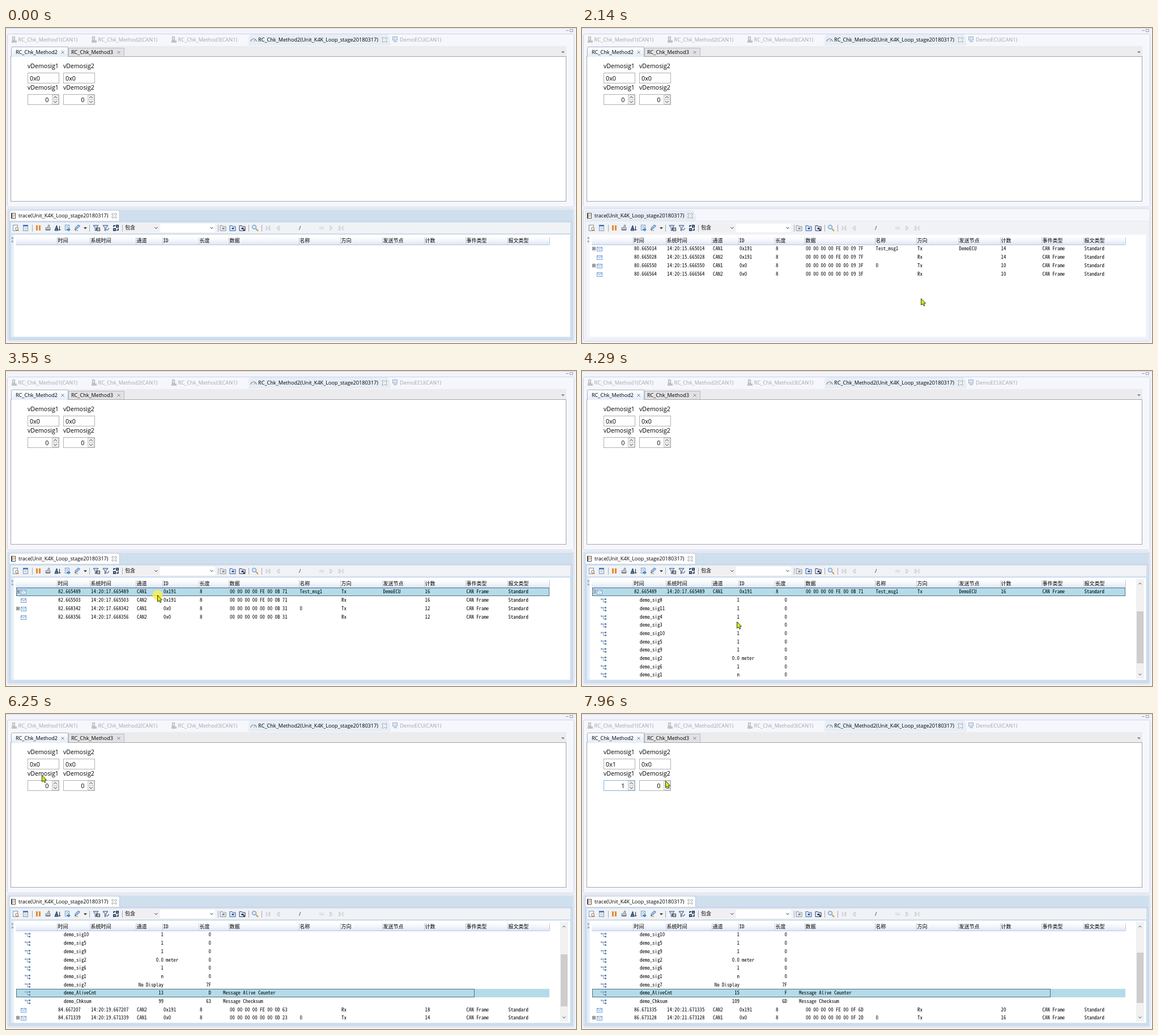
Recreate the animation shown at these times as an HTML page. Size 1006 px wide and 557 px high, loop 8000 ms.

```html
<!DOCTYPE html>
<html lang="zh-CN">
<head>
<meta charset="utf-8">
<title>CAN trace</title>
<style>
html, body { margin: 0; width: 100%; height: 100%; overflow: hidden; background: #f3f4fa; }
svg { display: block; width: 1006px; height: 557px; }
text { white-space: pre; }
.ui { font-family: "Open Sans", "Noto Sans", sans-serif; }
.cjk { font-family: "Noto Sans CJK SC", "Noto Sans CJK", sans-serif; }
.mono { font-family: "Noto Sans Mono CJK SC", "Noto Sans CJK SC", monospace; }
</style>
</head>
<body>
<svg id="stage" viewBox="0 0 1006 557" xmlns="http://www.w3.org/2000/svg">
  <defs>
    <linearGradient id="head" x2="0" y2="1"><stop offset="0" stop-color="#fff"/><stop offset=".45" stop-color="#f3f6fc"/><stop offset="1" stop-color="#dbe5f4"/></linearGradient>
    <linearGradient id="tab" x2="0" y2="1"><stop offset="0" stop-color="#fff"/><stop offset="1" stop-color="#e3edf8"/></linearGradient>
    <clipPath id="list"><rect x="14" y="366" width="981" height="178"/></clipPath>
  </defs>
  <g id="top"></g>
  <g id="fields"></g>
  <g id="frame"></g>
  <g id="tools"></g>
  <g id="rows" clip-path="url(#list)"></g>
  <g id="cursor">
    <circle id="halo" cx="0.5" cy="0.5" r="9" fill="#fff04a" fill-opacity=".8"/>
    <path d="M.5 .5V12L3.2 9.6L5 13.5L7 12.6L5.3 8.8H8.5Z" fill="#dcf400" stroke="#222" stroke-width=".9"/>
  </g>
</svg>
<script>
const LOOP = 8000;
const PROJECT = 'Unit_K4K_Loop_stage20180317';
const $ = id => document.getElementById(id);

const rect = (x, y, w, h, fill, stroke = 'none', more = '') =>
  `<rect x="${x}" y="${y}" width="${w}" height="${h}" fill="${fill}" stroke="${stroke}" ${more}/>`;
const path = (d, stroke, fill = 'none', width = 1) =>
  `<path d="${d}" fill="${fill}" stroke="${stroke}" stroke-width="${width}"/>`;
const text = (x, y, s, size = 9.2, fill = '#000', cls = 'ui', anchor = 'start') =>
  `<text x="${x}" y="${y}" font-size="${size}" fill="${fill}" class="${cls}" text-anchor="${anchor}">${s}</text>`;
const mono = (x, y, s, anchor) => text(x, y, s, 8.86, '#000', 'mono', anchor);
const cross = (x, y, r, color) => path(`M${x - r} ${y - r}l${2 * r} ${2 * r}m0 ${-2 * r}l${-2 * r} ${2 * r}`, color);
const chevron = (x, y, r, dir, color = '#444') => path(`M${x - r} ${y - dir * r / 2}l${r} ${dir * r}l${r} ${-dir * r}`, color);
const closeBox = (x, y) =>
  path(`M${x - 4} ${y - 4}h2l2 2l2 -2h2v2l-2 2l2 2v2h-2l-2 -2l-2 2h-2v-2l2 -2l-2 -2z`, '#888', '#fff', .8);

function drawTop() {
  const grey = '#a2a4a8';
  let s = rect(0, 0, 1006, 557, '#f3f4fa')
    + rect(0, 0, 1006, 1, '#d3d6e2')
    + path('M988 4.5h5', '#9a9eae') + rect(995.5, 2.5, 5, 4, '#fff', '#9a9eae')
    + rect(2.5, 10.5, 1000, 306, '#f5f7fc', '#cdd2e2', 'rx="3"')
    + rect(2.5, 319.5, 1000, 234, '#f5f7fc', '#cdd2e2', 'rx="3"')
    + path('M428 31V17Q428 11 434 11H671Q678 11 679 31Z', 'none', '#e8eef6');
  for (let i = 0; i < 3; i++) {
    const x = 14 + 141 * i;
    s += rect(x - 2.5, 15.5, 4, 6, '#ddd', '#b6b6b6') + rect(x - 4, 22, 9, 4, '#c2c2c2')
      + text(x + 7.5, 24.2, `RC_Chk_Method${i + 1}(CAN1)`, 9.25, grey);
  }
  s += path('M432 24a5 5 0 0 1 10 0', '#6a8ab0', '#e4effa', 1.2) + path('M437 24l3 -4', '#d07a30')
    + text(445, 24.2, `RC_Chk_Method2(${PROJECT})`, 9.15) + closeBox(668, 21)
    + rect(682.5, 15.5, 8, 6, '#d5e6f8', '#9db4cc') + rect(684, 23, 6, 2, '#b4c4d4')
    + text(695, 24.2, 'DemoECU(CAN1)', 9.25, grey);

  s += rect(8, 32, 981, 19, '#ececee')
    + rect(8.5, 50.5, 980, 256, '#fff', '#a5a5aa')
    + path('M110.5 50V35.5H208.5V50', '#b9b9bd', '#e2e2e5')
    + path('M9.5 51V37Q9.5 33.5 13 33.5H109.5V51', '#a9b8cb', 'url(#tab)')
    + text(17, 46.4, 'RC_Chk_Method2', 9.1) + cross(100, 43, 2.5, '#6f8299')
    + text(115, 46.4, 'RC_Chk_Method3', 9.1) + cross(199, 43, 2.5, '#888')
    + path('M980 41.5h6l-3 3z', 'none', '#777');
  $('top').innerHTML = s;
}

function drawFields(value) {
  let s = '';
  [value, 0].forEach((v, i) => {
    const x = 38 + 63 * i, label = 'vDemosig' + (i + 1);
    s += text(x, 70.6, label, 10.6) + text(x, 109, label, 10.6)
      + rect(x + .5, 79.5, 55, 18, '#fff', '#b0b0b0') + text(x + 4, 92.8, '0x' + v, 10.8)
      + rect(x + .5, 117.5, 55, 18, '#fff', v ? '#7fb2df' : '#b0b0b0')
      + text(x + 37.5, 131.2, v, 10.8, '#000', 'ui', 'end')
      + rect(x + 43.5, 118.5, 11, 8, '#f0f0f0', '#c8c8c8') + rect(x + 43.5, 126.5, 11, 8, '#f0f0f0', '#c8c8c8')
      + chevron(x + 49, 122.5, 3, -1) + chevron(x + 49, 130.5, 3, 1);
  });
  $('fields').innerHTML = s;
}

function drawFrame(active) {
  const edge = active ? '#cfdfee' : '#f1f3f9';
  $('frame').innerHTML =
    (active
      ? rect(4, 321, 997, 231, edge)
        + path('M5.5 342V325Q5.5 322 9 322H196Q200.5 322 200.5 327V341.5', '#b4c8de', '#fff')
      : path('M5 341V325Q5 322 9 322H194Q200 322 201 341Z', 'none', '#e6ecf5'))
    + rect(5.5, 341.5, 994, 209, edge, active ? '#c0d2e5' : '#e2e5ef')
    + rect(9, 344, 987, 19, '#f1f2f5')
    + rect(9, 365, 987, 181, active ? '#e6eef7' : '#f5f6fa')
    + rect(14, 366, 981, 180, '#fff')
    + rect(9.5, 327.5, 7, 9, '#fff', '#555') + path('M11 330.5h5M11 333h4', '#c98a3c') + rect(9, 327, 2, 10, '#445')
    + text(22, 335.2, `trace(${PROJECT})`, 9.1) + closeBox(191, 332);
}

const folder = (x, color) =>
  path(`M${x - 5} 358.5v-9h4l1 1.5h5v7.5z`, color, '#e8eef6') + rect(x - 1.5, 353, 4, 3, color);
const funnel = x => path(`M${x - 5} 349h9l-3.5 4.5v4l-2 1v-5z`, '#35507c', '#cfe0f4');

function drawTools() {
  const off = '#b9bcc4', cols = [17, 90, 148, 229, 276, 340, 393, 517, 590, 664, 738, 811, 885, 959];
  const names = ['时间', '系统时间', '通道', 'ID', '长度', '数据', '名称', '方向', '发送节点', '计数', '事件类型', '报文类型'];
  let s = [46, 147, 205, 374, 428, 451].map(x => path(`M${x + .5} 348v12`, '#a8a8ac')).join('');
  s += rect(12.5, 348.5, 8, 10, '#fff', '#6f93c0') + '<circle cx="19" cy="355" r="2.6" fill="#dff0ff" stroke="#c08030"/>' + path('M21 357l2 2', '#a06020')
    + rect(30.5, 348.5, 8, 10, '#fff', '#6f93c0') + rect(30, 348, 9, 3, '#4a80c0') + path('M32 353.5h5M32 356h5', '#9ab')
    + rect(53, 349, 3, 9, '#e58a2c') + rect(58, 349, 3, 9, '#e58a2c')
    + path('M70 357v-4h3l2 -5l2 1l-1 4h2v4z', '#7c8797', '#b9cbe0') + rect(70, 356, 8, 2, '#67758a')
    + path('M86 358l3.5 -9l2.5 9zM87.5 355h4', '#17305e', '#5b8cca') + path('M94.5 350v8m-2 -2l2 2l2 -2', '#222')
    + rect(104.5, 348.5, 7, 9, '#fff', '#6f93c0') + path('M106 351h4M106 353h4', '#89b') + path('M107 355h3v-2l4 3.5l-4 3.5v-2h-3z', 'none', '#3f8fd0')
    + path('M121.5 357l1 -4l5 -5l3 2l-5 5z', '#3e6fae', '#9fc5ee') + path('M122 358h5', '#e39a3e', 'none', 1.5)
    + path('M137 352.5h6l-3 3z', 'none', '#222')
    + funnel(159) + rect(160.5, 353.5, 5, 5, '#fff', '#333') + path('M161 356h4', '#555')
    + funnel(176) + path('M178 358l4 -4', '#3c87cc', 'none', 1.6)
    + rect(189.5, 354.5, 4, 4, '#4d8fd4', '#224') + rect(194.5, 348.5, 4, 4, '#4d8fd4', '#224')
    + path('M190 352v-2.5h3M198 354v3.5h-3', '#222', 'none', 1.4)
    + rect(208, 346, 62, 15, '#f0f0f2') + text(210, 356, '包含', 9, '#000', 'cjk') + chevron(265, 353.5, 2.5, 1, '#222')
    + rect(272, 346, 97, 15, '#fff') + chevron(363, 353.5, 2.5, 1, '#222')
    + folder(383, '#8a8f98') + folder(400, '#2f5fa8') + folder(417, '#2c3e60') + cross(420, 357, 2, '#222')
    + '<circle cx="438" cy="352" r="3.5" fill="#d8ecfb" stroke="#4a82bd"/>' + path('M441 355l4 4', '#d29338', 'none', 2)
    + path('M459.5 350v8M465.5 350v8l-4 -4zM482 350v8l-4 -4z', off)
    + text(517, 357, '/', 9, '#222') + text(553, 356, 'Go', 6.5, off)
    + path('M572 350v8l4 -4zM588 350v8l4 -4zM594.5 350v8', off)
    + path('M10 369v5l3.5 -2.5zM10 375v5l3.5 -2.5z', 'none', '#9aa3b4')
    + rect(17, 369, 942, 15, 'url(#head)') + path('M17 383.5H959', '#b9c8de')
    + cols.slice(1).map(x => path(`M${x + .5} 370v13`, '#c3cad8')).join('')
    + names.map((n, i) => text(cols[i + 1] + 1.5, 379.3, n, 9, '#000', n === 'ID' ? 'mono' : 'cjk')).join('');
  $('tools').innerHTML = s;
}

// Trace data: second -> microseconds of message 0x191 and of message 0x0
const stamps = {
  80: [665014, 666550], 81: [667629, 667186], 82: [665489, 668342], 83: [667013, 670165],
  84: [667193, 671339], 85: [669218, 672104], 86: [671321, 673128]
};
const updates = [[1360, 80], [2430, 81], [3500, 82], [4500, 83], [5620, 84], [6570, 85], [7470, 86]];
const signals = [8, 11, 4, 3, 10, 5, 9, 2, 6, 1, 7];
const hex = n => n.toString(16).toUpperCase().padStart(2, '0');

function crc8(n) {
  for (let i = 0; i < 8; i++) n = n & 128 ? (n << 1 ^ 7) & 255 : n << 1;
  return n;
}

function message(sec, isTest, rx) {
  const us = stamps[sec][isTest ? 0 : 1] + (rx ? 14 : 0), alive = sec - 71;
  const data = `00 00 00 00 ${isTest ? 'FE' : '00'} 00 ${hex(alive)} ${hex(crc8(alive) ^ (isTest ? 64 : 0))}`;
  const cells = [`${sec}.${us}`, `14:20:${sec - 65}.${us}`, rx ? 'CAN2' : 'CAN1', isTest ? '0x191' : '0x0', 8, data,
    rx ? '' : isTest ? 'Test_msg1' : '0', rx ? 'Rx' : 'Tx', isTest && !rx ? 'DemoECU' : '', sec - (isTest ? 66 : 70), 'CAN Frame', 'Standard'];
  return { cells, rx };
}

function signal(name, value, raw, note = '') {
  return { signal: [name, value, raw, note] };
}

function items(sec, open) {
  const alive = sec - 71, sum = crc8(alive) ^ 64;
  const special = { 2: ['0.0', 0, ' meter'], 1: ['n', 0], 7: ['No Display', '7F'] };
  const kids = signals.map(n => {
    const [v, raw, unit] = special[n] || [1, 0];
    return { ...signal('demo_sig' + n, v, raw), unit };
  });
  kids.push(signal('demo_AliveCnt', alive, alive.toString(16).toUpperCase(), 'Message Alive Counter'),
    signal('demo_Chksum', sum, hex(sum), 'Message Checksum'));
  return [{ ...message(sec, true, false), open }, ...(open ? kids : []),
    message(sec, true, true), message(sec, false, false), message(sec, false, true)];
}

const cellX = [92, 150, 231, 278, 342, 395, 518.5, 592, 665.5, 739.5, 812.5, 886.5];

function drawItem(it, y) {
  const base = y + 3.4;
  if (it.signal) {
    const [name, value, raw, note] = it.signal;
    return path(`M35.5 ${y - 1.5}h5M37.5 ${y - 1.5}v5h3`, '#8fa0b8')
      + rect(33, y - 3, 3, 3, '#9fb4d0') + rect(40, y - 3, 3, 3, '#6d8fc0') + rect(40, y + 2, 3, 3, '#6d8fc0')
      + mono(102, base, name) + mono(278, base, value, 'end') + (it.unit ? mono(277.7, base, it.unit) : '')
      + mono(362, base, raw, 'end') + mono(383, base, note);
  }
  let s = rect(26.5, y - 2.5, 9, 7, '#eaf3fd', '#7ba3d4') + path(`M27 ${y - 2}l4 3.5l4 -3.5`, '#7ba3d4');
  if (!it.rx) s += rect(18.5, y - 2.5, 5, 5, '#fff', '#777') + path(`M19.5 ${y}h3${it.open ? '' : 'M21 ' + (y - 1.5) + 'v3'}`, '#222');
  return s + it.cells.map((c, i) => c === '' ? '' : mono(cellX[i], base, c)).join('');
}

function drawRows({ sec, open, first, picked, thumb, thumbSize }) {
  let s = '';
  if (sec) items(sec, open).slice(first, first + 11).forEach((it, i) => {
    const y = Math.round(390.4 + 14.7 * i);
    if (first + i === picked) {
      const w = it.signal ? 809 : 941;
      s += rect(18, y - 7, 941, 15, '#b5dbe9') + rect(18.5, y - 6.5, w - 1, 14, 'none', '#486f82');
    }
    s += drawItem(it, y);
  });
  if (thumb) s += rect(978, 368, 14, 176, '#f1f1f1') + chevron(985, 376, 2.5, -1) + chevron(985, 536.5, 2.5, 1)
    + rect(979, thumb, 12, thumbSize, '#cdcdcd');
  $('rows').innerHTML = s;
}

const route = [
  [2010, 797, 543], [2140, 598, 478], [2300, 468, 440], [2550, 335, 412], [2790, 285, 402], [3200, 267, 396],
  [3940, 267, 396], [4290, 273, 443], [4390, 273, 443], [4580, 297, 489], [5240, 297, 489], [5360, 304, 503],
  [5870, 304, 503], [5930, 437, 543], [6060, 437, 543], [6250, 63, 108], [6280, 63, 108], [6420, 57, 87],
  [6820, 88, 126], [7690, 88, 126], [7960, 147, 118], [LOOP, 147, 118]
];
const clicks = [[3290, 3400], [3480, 3600], [4840, 5000], [6980, 7130]];

function moveCursor(t) {
  const i = route.findIndex(p => p[0] > t);
  $('cursor').style.display = i > 0 ? '' : 'none';
  if (i < 1) return;
  const [t0, x0, y0] = route[i - 1], [t1, x1, y1] = route[i], k = (t - t0) / (t1 - t0);
  $('cursor').setAttribute('transform', `translate(${Math.round(x0 + (x1 - x0) * k)} ${Math.round(y0 + (y1 - y0) * k)})`);
  $('halo').style.display = clicks.some(([a, b]) => t >= a && t < b) ? '' : 'none';
}

function listState(t) {
  const late = t >= 7470;
  return {
    sec: updates.reduce((s, [at, v]) => t >= at ? v : s, 0),
    open: t >= 3650,
    first: t >= 4390 ? 5 : 0,
    picked: t >= 4840 ? 12 : t >= 3400 ? 0 : -1,
    thumb: t < 3940 ? 0 : t < 4290 ? 382 : late ? 422 : 425,
    thumbSize: late ? 89 : 92
  };
}

const shown = {};
function refresh(name, state, draw) {
  const key = JSON.stringify(state);
  if (shown[name] === key) return;
  shown[name] = key;
  draw(state);
}

function render(now) {
  const t = now % LOOP;
  refresh('fields', t >= 7300 ? 1 : 0, drawFields);
  refresh('frame', t < 640 || t >= 3400, drawFrame);
  refresh('rows', listState(t), drawRows);
  moveCursor(t);
}

drawTop();
drawTools();
render(0);
let start;
requestAnimationFrame(function tick(now) {
  start ??= now;
  render(now - start);
  requestAnimationFrame(tick);
});
</script>
</body>
</html>
```
